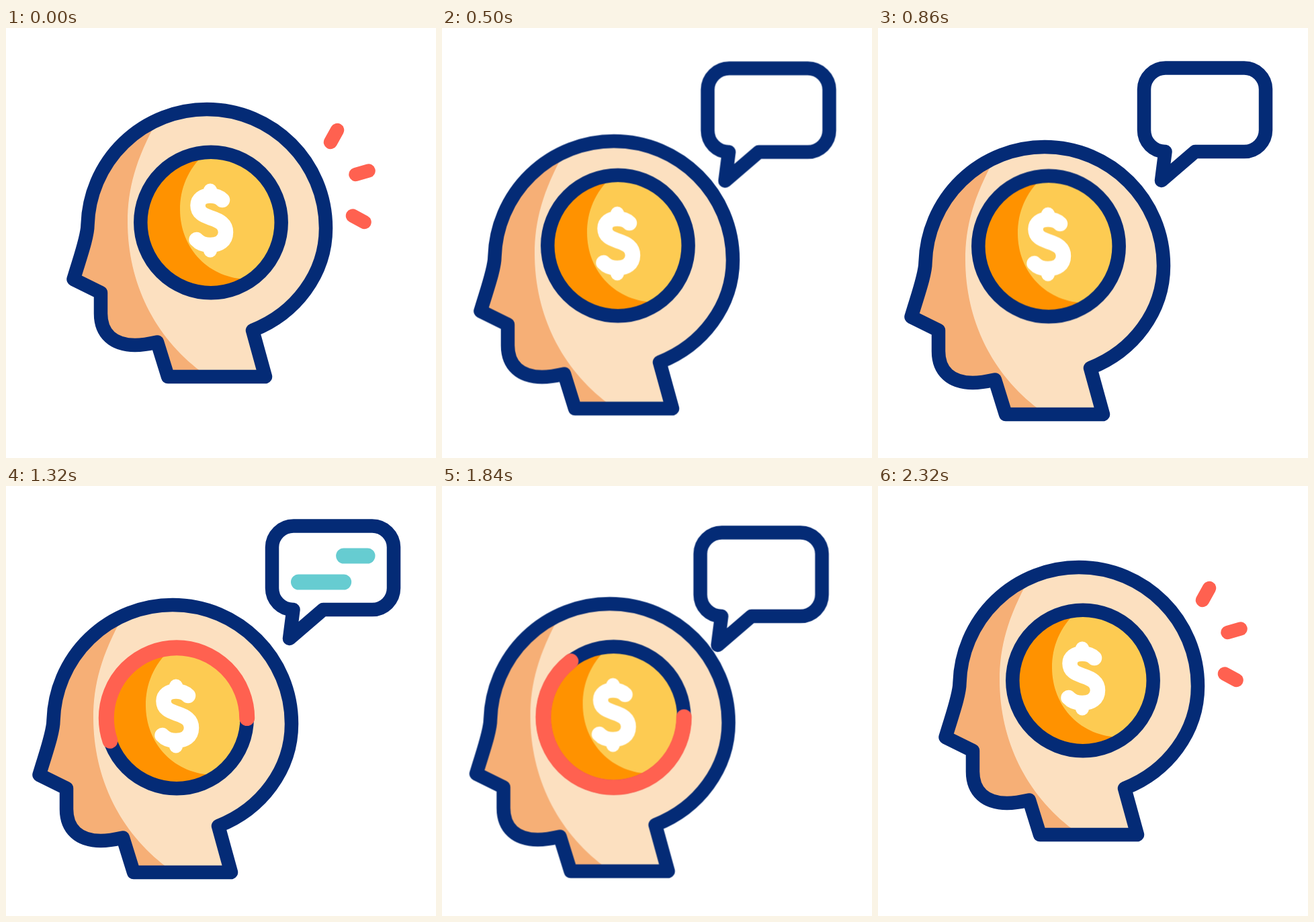
An HTML page for the animation above (2.4 s loop, 640 px wide and 640 px high).

```html
<!DOCTYPE html>
<html lang="en">
<head>
<meta charset="utf-8">
<title>Thinking about money</title>
<style>
  html, body { margin: 0; width: 100%; height: 100%; overflow: hidden; background: #fff; }
  svg { display: block; width: 100vw; height: 100vh; }

  path, circle { fill: none; stroke-linecap: round; stroke-linejoin: round; }
  .ink { stroke: #042b76; stroke-width: 20.5; }
  .skin { fill: #fce0c0; }
  .skin-shade { fill: #f6af76; }
  .gold { fill: #fdcb52; }
  .gold-shade { fill: #ff9200; }
  .bubble path { fill: #fff; }
  .dollar { stroke: #fff; stroke-width: 22.5; }
  .spark { stroke: #ff6150; stroke-width: 20.5; }
  .ring { stroke: #ff6150; stroke-width: 23; }
  .text { stroke: #66ccd1; stroke-width: 23; }

  .head, .coin, .bubble, .trim {
    animation: 2.4s cubic-bezier(.3333, 0, .6667, 1) infinite both;
  }
  .head { animation-name: head; }
  .coin { animation-name: bounce; }
  .bubble { animation-name: bubble; }
  .trim { stroke-dasharray: 1 3; }
  .spark { animation-name: spark; }
  .ring { animation-name: ring; }
  .top { animation-name: top; }
  .bottom { animation-name: bottom; }

  @keyframes head {
    0%, 8.333%, 91.667%, 100% { transform: translate(0, 0); }
    25%, 75% { transform: translate(-51px, 56px); }
  }
  @keyframes bounce {
    0%, 8.333%, 25%, 41.667%, 100% { transform: translateY(0); }
    16.667%, 33.333% { transform: translateY(-26.6px); }
  }
  @keyframes bubble {
    0%, 8.333%, 87.917%, 100% { transform: translate(-241px, 205px); }
    21.25%, 75% { transform: translate(0, 0); }
  }
  /* dash offset 1: not drawn yet, 0: complete, -1: wiped away */
  @keyframes spark {
    0%, 8.333% { stroke-dashoffset: 0; opacity: 1; }
    16.666% { stroke-dashoffset: -1; opacity: 1; }
    16.667% { stroke-dashoffset: 1; opacity: 0; }
    87.5% { stroke-dashoffset: 1; opacity: 0; }
    87.501% { stroke-dashoffset: 1; opacity: 1; }
    96.25%, 100% { stroke-dashoffset: 0; opacity: 1; }
  }
  @keyframes ring {
    0%, 41.667% { stroke-dashoffset: 1; opacity: 0; }
    41.668% { stroke-dashoffset: 1; opacity: 1; }
    66.667% { stroke-dashoffset: 0; opacity: 1; }
    91.666% { stroke-dashoffset: -1; opacity: 1; }
    91.667%, 100% { stroke-dashoffset: -1; opacity: 0; }
  }
  @keyframes top {
    0%, 41.667% { stroke-dashoffset: 1; opacity: 0; }
    41.668% { stroke-dashoffset: 1; opacity: 1; }
    50% { stroke-dashoffset: 0; opacity: 1; }
    58.333% { stroke-dashoffset: -1; opacity: 1; }
    58.334%, 100% { stroke-dashoffset: -1; opacity: 0; }
  }
  @keyframes bottom {
    0%, 50% { stroke-dashoffset: 1; opacity: 0; }
    50.001% { stroke-dashoffset: 1; opacity: 1; }
    58.333% { stroke-dashoffset: 0; opacity: 1; }
    66.666% { stroke-dashoffset: -1; opacity: 1; }
    66.667%, 100% { stroke-dashoffset: -1; opacity: 0; }
  }
</style>
</head>
<body>
<svg viewBox="0 0 640 640">
  <defs>
    <path id="profile" d="M100.5 374C109 345 121.5 311 121.5 293A177.5 177 0 0 1 299 121
      C397 121 476 200 476 298C476 366 431 425 367 450L386 519H241L225 467.500
      C214 470 204 472 192 472C160 472 141 455 141 425V394Z"/>
    <clipPath id="in-head"><use href="#profile"/></clipPath>
    <clipPath id="in-coin"><circle cx="305" cy="289.500" r="104"/></clipPath>
  </defs>

  <g class="bubble">
    <path class="ink" d="M427.500 184C410 184 396 170 396 152V91A32 32 0 0 1 428 59.500H545
      A32 32 0 0 1 577 91V152A32 32 0 0 1 545 184H472L422 227Z"/>
  </g>
  <path class="text trim top" pathLength="1" d="M435.500 104H538"/>
  <path class="text trim bottom" pathLength="1" d="M435.500 143H538"/>

  <g class="head">
    <use href="#profile" class="skin" style="fill:#fce0c0"/>
    <g clip-path="url(#in-head)">
      <path class="skin-shade" d="M225 138C193 195 181 240 181 288C181 380 222 460 290 511V530H80V138Z"/>
    </g>
    <path class="ink" d="M100.5 374C109 345 121.5 311 121.5 293A177.5 177 0 0 1 299 121
      C397 121 476 200 476 298C476 366 431 425 367 450L386 519H241L225 467.500
      C214 470 204 472 192 472C160 472 141 455 141 425V394Z"/>

    <g class="coin">
      <circle class="gold" cx="305" cy="289.500" r="104"/>
      <g clip-path="url(#in-coin)">
        <path class="gold-shade" d="M297 186C270 210 259 240 259 270C259 328 302 374 362 374V400H190V186Z"/>
      </g>
      <circle class="ink" cx="305" cy="289.500" r="104.700"/>
      <path class="dollar" d="M322 256C317 251 311 249.500 304 249.500C293 249.500 285.500 255 285.500 264
        C285.500 276 295 279 306 283C318 287 327 292 327 304C327 317 317 323 304 323
        C295 323 288 320 283.500 315"/>
      <path class="dollar" style="stroke-width:20" d="M304 241.500V249M304 324V331.500"/>
      <path class="ring trim" pathLength="1"
        d="M409.700 289.500A104.700 104.700 0 0 0 200.300 289.500A104.700 104.700 0 0 0 409.700 289.500"/>
    </g>
  </g>

  <path class="spark trim" pathLength="1" d="M483 170L493 152"/>
  <path class="spark trim" pathLength="1" d="M520.500 218L539.500 212.500"/>
  <path class="spark trim" pathLength="1" d="M516 279.500L533.500 289"/>
</svg>
<script>
  // Reuse the head outline as fill: paths default to no fill, so let it inherit.
  document.getElementById('profile').style.fill = 'inherit';
</script>
</body>
</html>
```
